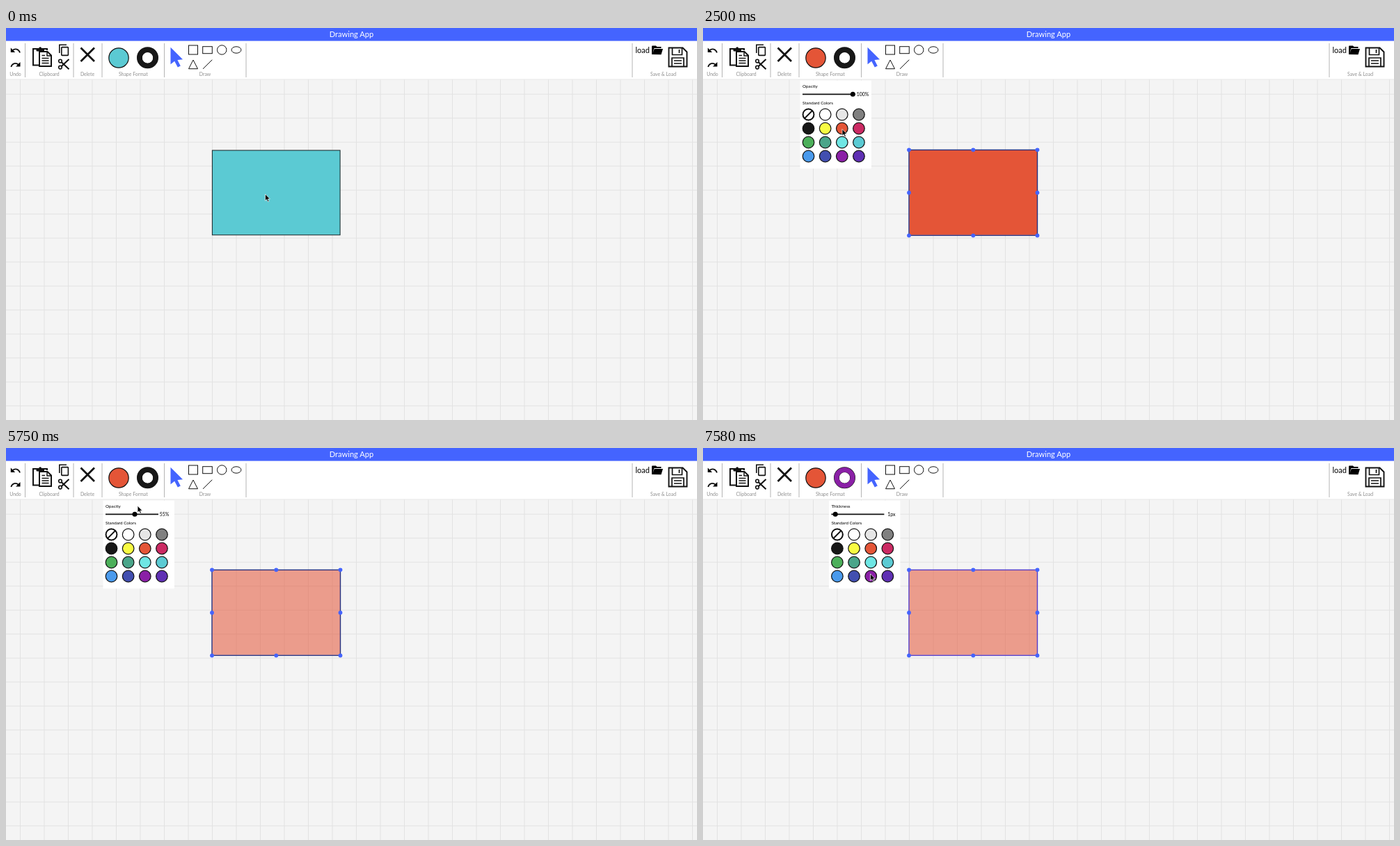
An HTML page for the animation above (8 s loop, 993 by 564 pixels).

```html
<!DOCTYPE html>
<html lang="en">
<head>
<meta charset="utf-8">
<title>Drawing App</title>
<style>
html, body { margin: 0; width: 100%; height: 100%; overflow: hidden; background: #f4f4f4; }
svg { display: block; width: 993px; height: 564px; font-family: Lato, sans-serif; }
.label { font-size: 6.9px; fill: #8f8f8f; text-anchor: middle; }
.small { font-size: 6.3px; }
.line { fill: none; stroke: #111; }
</style>
</head>
<body>
<svg viewBox="0 0 993 564">
  <defs>
    <pattern id="grid" x="20" y="94.75" width="34.5" height="34.5" patternUnits="userSpaceOnUse">
      <path d="M.5 0V34.5M0 .5H34.5" stroke="#e2e2e2" fill="none"/>
    </pattern>
  </defs>
  <rect width="993" height="564" fill="#f4f4f4"/>
  <rect y="74" width="993" height="490" fill="url(#grid)"/>

  <rect y="73" width="993" height="1.5" fill="#ebebeb"/>
  <rect y="18" width="993" height="55.3" fill="#fff"/>
  <rect width="993" height="18.6" fill="#4464ff"/>
  <text x="496.5" y="12.8" font-size="11.1" fill="#fff" text-anchor="middle">Drawing App</text>
  <path d="M27.5 22V71M97 22V71M138 22V71M227.5 22V71M345 22V71M900 22V71" stroke="#b4b4b4"/>
  <rect class="hover" x="140" y="24" width="46" height="42" fill="#f4f4f4"/>
  <rect class="hover" x="181" y="24" width="46" height="42" fill="#f4f4f4"/>
  <g id="labels"></g>

  <g id="undo">
    <path d="M6.8 28.5V35H13.2Z"/>
    <path class="line" d="M9 32.6C13 28.8 18.500 30.2 20 35.600" stroke-width="1.8"/>
  </g>
  <use href="#undo" transform="matrix(-1 0 0 1 27.300 20.500)"/>

  <g class="line" stroke-width="2">
    <path d="M48 53.500H39V30H44M54 30H59V32"/>
    <path d="M44 33V29.500H47Q49 26 51.500 29.500H54.500V33Z" fill="#111" stroke-width="1"/>
    <path d="M48 34H59.500L65 39.500V55H48Z" fill="#fff"/>
    <path d="M59 34V40H65M51.500 39.500H56M51.500 43.500H61.500M51.500 47H61.500M51.500 50.500H61.500" stroke-width="1.5"/>
  </g>
  <g class="line" stroke-width="1.6">
    <path d="M76.800 36V24.300H87"/>
    <rect x="79.800" y="27.600" width="9.600" height="11.800" rx=".8"/>
    <circle cx="78" cy="47.600" r="2.300"/>
    <circle cx="78" cy="56.600" r="2.300"/>
    <path d="M79.500 49L90.500 59.300M79.500 55.200L90.500 45" stroke-width="2.100"/>
  </g>
  <path class="line" d="M107.500 28.500L127 48M127 28.500L107.500 48" stroke-width="2.800"/>

  <circle id="ring" cx="161" cy="42.300" r="15.200" fill="#fff" stroke="#111" stroke-width="1.200"/>
  <circle id="fillIcon" cx="162" cy="43" r="14.200" stroke="#111" stroke-width="1.200"/>
  <circle cx="203.500" cy="42.800" r="11.500" fill="#fff"/>
  <circle cx="203.500" cy="42.800" r="11.500" fill="none" stroke="#171717" stroke-width="8"/>
  <circle id="strokeIcon" cx="203.500" cy="42.800" r="11.500" fill="none" stroke-width="6.800"/>
  <circle id="hole" cx="203.500" cy="42.800" r="7.600"/>

  <path d="M236.500 27.700V52.300L242.200 47.700L246.800 56.500L250.800 54.400L246.400 45.900L254 45.200Z" fill="#4464ff"/>
  <g class="line">
    <rect x="262.500" y="25" width="13" height="13"/>
    <rect x="282.700" y="26.700" width="13.600" height="10"/>
    <circle cx="310.200" cy="31.500" r="6.700"/>
    <ellipse cx="331" cy="31.500" rx="6.900" ry="4.700"/>
    <path d="M262.500 58.700L269 46L275.500 58.700ZM283 58.800L296.300 45.700"/>
  </g>

  <text x="904.500" y="35.700" font-size="11.040">load</text>
  <path d="M928 38V26.500Q928 25.500 929 25.500H934L935.500 27H941.500V29H931.500L929 36.500L931.800 30H944L941.500 38.300Z"/>
  <g class="line" stroke-width="1.900">
    <path d="M952.500 28.500H972.500L978.500 34.500V55.500H952.500Z"/>
    <path d="M957.500 28.500V38.500H971.500V28.500M957 55V43H974V55" stroke-width="1.700"/>
    <path d="M967.500 31V36M960 47H971M960 51H971" stroke-width="1.700"/>
  </g>

  <g id="shape">
    <rect id="box"/>
    <rect id="outline" fill="none"/>
    <g id="handles" fill="#4464ff"></g>
  </g>
  <g id="fillPanel"></g>
  <g id="strokePanel" transform="translate(41.400 0)"></g>

  <g id="cursor">
    <path id="arrow" d="M0 0V9.600L2.200 7.600L3.700 11L5.400 10.300L3.900 7H6.900Z" fill="#000" stroke="#fff" stroke-width=".7"/>
    <path id="hand" d="M-.9 .8Q0 -.6 .9 .8V4.200L5.200 5.200Q6.300 5.600 6 7L5.200 11H.2L-3 6.800Q-2.800 5.400 -.9 6.800Z" fill="#fff" stroke="#000" stroke-width=".8"/>
  </g>
</svg>
<script>
const LOOP = 8000;
const TEAL = '#5bcad3', ORANGE = '#e45537', PURPLE = '#8a20a6';
const SWATCHES = ['#fff', '#fff', '#e6e6e6', '#808080',
  '#171717', '#f8fb43', ORANGE, '#cb2a63',
  '#4caf5a', '#4aa58a', '#6fe6e4', TEAL,
  '#4a9aec', '#424fb0', PURPLE, '#5f30b3'];

// Cursor legs: start, end, target x, target y, linear
const START = [372.5, 239];
const LEGS = [
  [440, 1120, 161, 42],
  [1560, 2380, 200, 145.5],
  [2860, 3870, 193, 45, true],
  [4360, 5120, 185, 95.5],
  [5560, 6220, 205, 35],
  [6560, 7340, 240.500, 181]
];
const AT = { select: 40, fillOpen: 1210, recolor: 2460, press: 5150, opacity: 5210, strokeOpen: 6250, restroke: 7460 };

const $ = id => document.getElementById(id);
const set = (el, attrs) => { for (const k in attrs) el.setAttribute(k, attrs[k]); };
const show = (el, on) => el.setAttribute('visibility', on ? 'visible' : 'hidden');

$('labels').innerHTML = [['Undo', 13.5], ['Clipboard', 62], ['Delete', 117], ['Shape Format', 182.8], ['Draw', 286], ['Save & Load', 944.500]]
  .map(([s, x]) => `<text class="label" x="${x}" y="69.300">${s.replace('&', '&amp;')}</text>`).join('');

for (const y of [175.3, 237, 298.600])
  for (const x of [296, 388.300, 480.500])
    if (x !== 388.300 || y !== 237)
      $('handles').innerHTML += `<circle cx="${x}" cy="${y}" r="2.900"/>`;

function buildPanel(el, title, value, valueX, thumbX) {
  const dots = SWATCHES.map((c, i) =>
    `<circle cx="${151.500 + i % 4 * 24.150}" cy="${124.500 + (i >> 2) * 20}" r="8.300" fill="${c}" stroke="#111" stroke-width="1.200"/>`).join('');
  el.innerHTML = `<rect x="139.500" y="75.500" width="102.500" height="126.700" rx="1" fill="#fff"/>
    <text class="small" x="143" y="85.700">${title}</text>
    <text class="small" x="143" y="109.700">Standard Colors</text>
    <path d="M143 95.300H219" stroke="#111" stroke-width="1.700"/>
    <circle class="thumb" cx="${thumbX}" cy="95.300" r="3.500"/>
    <circle class="ripple" cx="185.500" cy="95.500" r="21" fill="none" stroke="#111" stroke-width="1.200" visibility="hidden"/>
    <text class="value" x="${valueX}" y="97.600" font-size="6.900">${value}</text>
    ${dots}<circle cx="151.500" cy="124.500" r="7.800" fill="none" stroke="#111" stroke-width="1.700"/>
    <path d="M146 130L157 119" stroke="#111" stroke-width="1.800"/>`;
}
buildPanel($('fillPanel'), 'Opacity', '100%', 220.700, 215.300);
buildPanel($('strokePanel'), 'Thickness', '1px', 223.800, 148.800);

const thumb = document.querySelector('#fillPanel .thumb');
const ripple = document.querySelector('#fillPanel .ripple');
const value = document.querySelector('#fillPanel .value');
const hovers = document.querySelectorAll('.hover');

function cursorAt(t) {
  let [x, y] = START;
  for (const [a, b, tx, ty, linear] of LEGS) {
    const p = Math.min(1, Math.max(0, (t - a) / (b - a)));
    const e = linear ? p : p * p * (3 - 2 * p);
    x += (tx - x) * e;
    y += (ty - y) * e;
  }
  return [x, y];
}

function draw(t) {
  const [x, y] = cursorAt(t);
  const selected = t >= AT.select;
  const fill = t < AT.recolor ? TEAL : ORANGE;
  const restroked = t >= AT.restroke;

  set($('box'), { x: 296.400, y: 176, width: 183.700, height: 121.800, fill,
    'fill-opacity': t < AT.opacity ? 1 : .55,
    stroke: selected ? 'none' : '#152325' });
  set($('outline'), { x: 296, y: 175.400, width: 184.500, height: 123,
    stroke: restroked ? '#533bc8' : '#25307f', 'stroke-width': 1.400 });
  show($('outline'), selected);
  show($('handles'), selected);

  const onButtons = y > 24 && y < 66;
  const onFill = onButtons && x > 140 && x < 181;
  const onStroke = onButtons && x >= 181 && x < 227;
  show(hovers[0], onFill);
  show(hovers[1], onStroke);
  show($('ring'), onFill);
  set($('fillIcon'), { fill, cx: onFill ? 161.300 : 162, r: onFill ? 13.300 : 14.200 });
  set($('strokeIcon'), { stroke: restroked ? PURPLE : '#171717' });
  set($('hole'), { fill: onStroke ? '#f4f4f4' : '#fff' });

  show($('fillPanel'), t >= AT.fillOpen && t < AT.strokeOpen);
  show($('strokePanel'), t >= AT.strokeOpen);
  show(ripple, t >= AT.press && t < AT.opacity);
  set(thumb, { cx: t < AT.press ? 215.300 : 185 });
  value.textContent = t < AT.opacity ? '100%' : '55%';

  const onSlider = t > 4360 && t < AT.strokeOpen && y > 89 && y < 102;
  show($('hand'), onSlider);
  show($('arrow'), !onSlider);
  set($('cursor'), { transform: `translate(${x} ${y})` });
}

const t0 = performance.now();
function tick() {
  draw((performance.now() - t0) % LOOP);
  requestAnimationFrame(tick);
}
tick();
</script>
</body>
</html>
```
